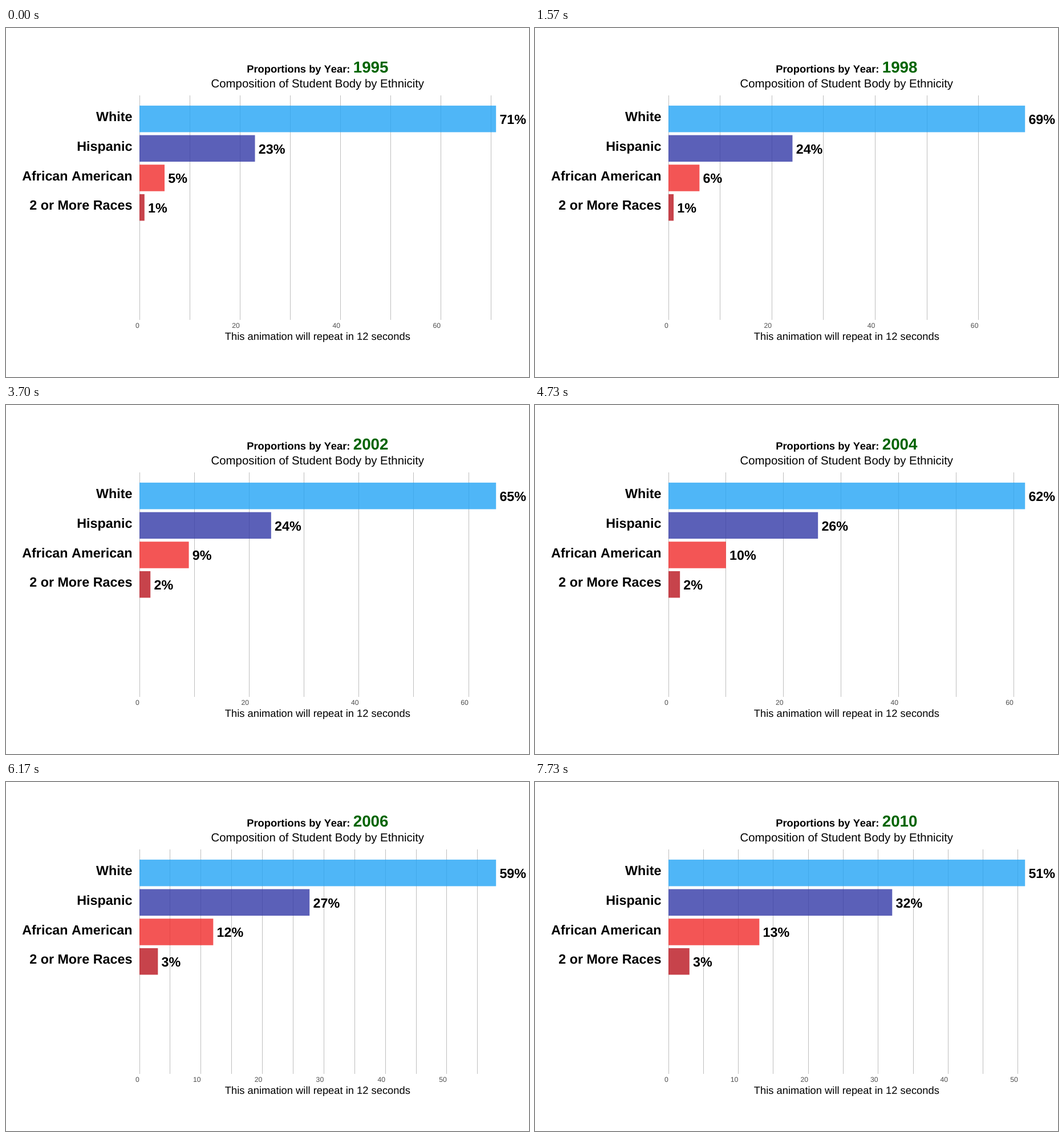
Recreate the animation shown at these times as an HTML page with a canvas. Size 917 px wide and 611 px high, loop 8 s.

```html
<!DOCTYPE html>
<html lang="en">
<head>
<meta charset="utf-8">
<title>Student body by ethnicity</title>
<style>
  html, body { margin: 0; width: 100%; height: 100%; overflow: hidden; background: #fff; }
  canvas { display: block; }
</style>
</head>
<body>
<canvas id="chart" width="917" height="611"></canvas>
<script>
const ctx = document.getElementById('chart').getContext('2d');
const LOOP = 8000, FIRST_YEAR = 1995, LAST = 15;
const LEFT = 234, WIDTH = 625.2, CENTER = 546.3, ROW = 51.67;

// Trends bend at a few years (counted from the first) and run straight between
const bends = [0, 2, 5, 11, 12, 14, LAST];
const groups = [
  { name: 'White', color: '#24a4f5', trend: [71, 69, 68, 59, 56, 53, 51] },
  { name: 'Hispanic', color: '#3239a7', trend: [23, 25, 23, 27, 29, 31, 32] },
  { name: 'African American', color: '#f02b2b', trend: [5, 5, 7.8, 11.6, 12, 12, 13] },
  { name: '2 or More Races', color: '#ba151e', trend: [1, 1, 1.6, 2.8, 3.4, 4, 3] }
];

const mix = (a, b, p) => a + (b - a) * p;

// Whole percentage of a group in a given year, halves rounded down
function percent({ trend }, year) {
  const k = Math.max(1, bends.findIndex(b => b >= year));
  const p = (year - bends[k - 1]) / (bends[k] - bends[k - 1]);
  return Math.ceil(mix(trend[k - 1], trend[k], p) - 0.5);
}

// Each change takes three ticks of 1/30 s; later years follow a tick sooner
const changeTick = i => 13 + 16 * i - Math.max(0, i - 7);

function stateAt(ms) {
  const tick = Math.floor(ms * 0.03 + 0.12);
  let year = 0;
  while (year < LAST - 1 && tick >= changeTick(year + 1)) year++;
  const p = Math.min(1, Math.max(0, (tick - changeTick(year) + 1) / 3));
  return {
    shown: p < 0.5 ? year : year + 1,
    values: groups.map(g => mix(percent(g, year), percent(g, year + 1), p))
  };
}

function text(str, x, y, size, { bold = false, align = 'left', color = '#000' } = {}) {
  ctx.font = `${bold ? 'bold ' : ''}${size}px "Liberation Sans", Arial, sans-serif`;
  ctx.textAlign = align;
  ctx.fillStyle = color;
  ctx.fillText(str, x, y);
}

function drawAxis(max, toX) {
  const step = max < 60.7 ? 10 : 20;
  for (let v = 0; v <= max + 1e-6; v += step / 2) {
    const x = toX(v);
    ctx.fillStyle = '#bebebe';
    ctx.fillRect(Math.floor(x), 118, 1, 393);
    if (v % step === 0) text(v, x - 0.2, 525, 12.22, { align: 'right', color: '#4d4d4d' });
  }
}

function drawRow(i, value, shown, toX) {
  const group = groups[i], y = i * ROW, end = toX(value);
  ctx.globalAlpha = 0.8;
  ctx.fillStyle = group.color;
  ctx.fillRect(LEFT, 135.9 + y, end - LEFT, 46.5);
  ctx.globalAlpha = 1;
  text(group.name, 221.4, 163.2 + y, 23.33, { bold: true, align: 'right' });
  text(`${percent(group, shown)}%`, end + 6.2, 168 + y, 23.33, { bold: true });
}

function draw(ms) {
  const { shown, values } = stateAt(ms);
  const max = values[0];
  const toX = v => LEFT + v / max * WIDTH;

  ctx.fillStyle = '#fff';
  ctx.fillRect(0, 0, 917, 611);
  drawAxis(max, toX);
  values.forEach((v, i) => drawRow(i, v, shown, toX));

  text('Proportions by Year:', 422.2, 78, 18.33, { bold: true });
  text(FIRST_YEAR + shown, 608.7, 78, 27.78, { bold: true, color: '#006400' });
  text('Composition of Student Body by Ethnicity', CENTER, 104, 20.38, { align: 'center' });
  text('This animation will repeat in 12 seconds', CENTER, 546, 18.33, { align: 'center' });
}

ctx.fontKerning = 'none';
ctx.textRendering = 'geometricPrecision';
const start = performance.now();
function loop() {
  draw((performance.now() - start) % LOOP);
  requestAnimationFrame(loop);
}
loop();
</script>
</body>
</html>
```
